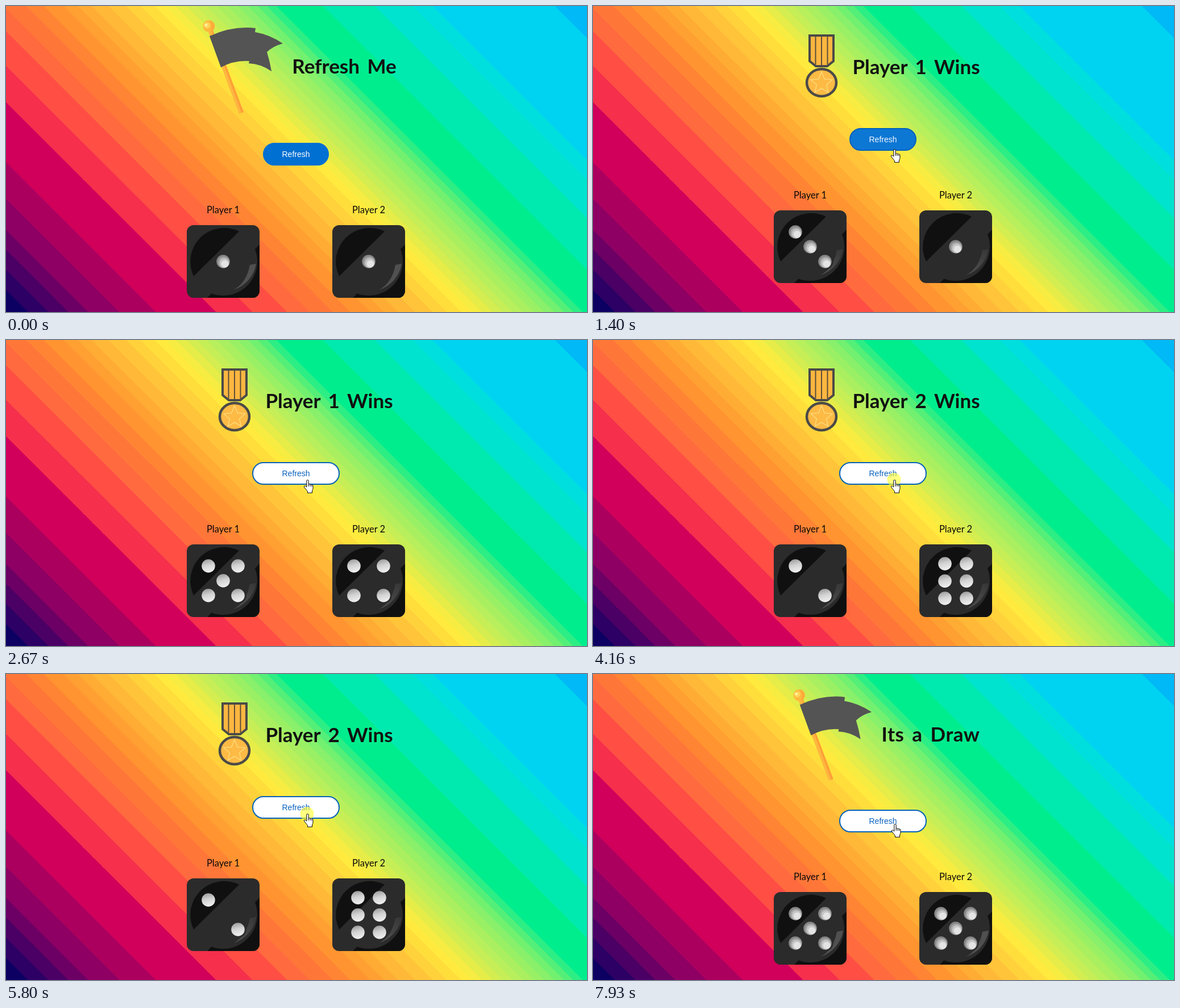
An HTML page for the animation above (8000 ms loop, 1022x539 px).

```html
<!DOCTYPE html>
<html lang="en">
<head>
<meta charset="utf-8">
<title>Dice game</title>
<style>
  html, body { margin: 0; width: 100%; height: 100%; overflow: hidden; }
  svg { display: block; width: 100vw; height: 100vh; }
  text { text-anchor: middle; font-family: Lato, sans-serif; }
  #title { font-size: 35px; font-weight: 700; word-spacing: 5px; fill: #111; }
  .label { font-size: 16.5px; fill: #0a0a0a; }
  #caption { font: 14px "Liberation Sans", Arial, sans-serif; }
</style>
</head>
<body>
<svg viewBox="0 0 1022 539">
  <defs>
    <linearGradient id="rainbow" gradientUnits="userSpaceOnUse" x1="0" y1="539" x2="780.5" y2="-241.5"></linearGradient>
    <linearGradient id="pipFill" x1=".35" y1="0" x2=".6" y2="1">
      <stop offset="0" stop-color="#9c9c9c"/><stop offset=".45" stop-color="#d2d2d2"/><stop offset="1" stop-color="#f2f2f2"/>
    </linearGradient>
    <linearGradient id="shine" gradientUnits="userSpaceOnUse" x1="118" y1="68" x2="88" y2="114">
      <stop offset="0" stop-color="#373737"/><stop offset="1" stop-color="#505050"/>
    </linearGradient>
    <clipPath id="dieClip"><rect width="128" height="128" rx="12"/></clipPath>
    <g id="dieBody" clip-path="url(#dieClip)">
      <rect width="128" height="128" fill="#2b2b2b"/>
      <path d="M128 34L36 128H128Z" fill="#101010"/>
      <circle cx="64" cy="64" r="60" fill="#2b2b2b"/>
      <path d="M12 90A59.5 59.5 0 0 1 92 11Z" fill="#101010"/>
    </g>
    <path id="glare" d="M111 70L122 68A58 58 0 0 1 82 114Q105 102 111 70Z"/>
    <g id="pipFlat">
      <circle r="11.8" fill="#858585"/>
      <circle cx="1" cy="1.4" r="10" fill="#a6a6a6"/>
      <circle cx="2" cy="2.8" r="8.4" fill="#c6c6c6"/>
      <circle cx="3" cy="4.2" r="6.2" fill="#e4e4e4"/>
    </g>
    <circle id="pipSoft" r="11.8" fill="url(#pipFill)"/>
  </defs>

  <rect width="1022" height="539" fill="url(#rainbow)"/>

  <g id="flag">
    <path d="M356 46L364 43L418 187L410 190Z" fill="#ffb740"/>
    <path d="M362 44L364 43L418 187L414 188.500Z" fill="#ff9f38"/>
    <circle cx="357" cy="35.500" r="10.500" fill="#ffb83d"/>
    <path d="M358 25.500A10.500 10.500 0 0 1 360 45.500Q364 34 358 25.500Z" fill="#ffaa3c"/>
    <circle cx="353.500" cy="34" r="5.500" fill="#ffd45a"/>
    <circle cx="352" cy="33.500" r="2.500" fill="#fff0a0"/>
    <path d="M358 53Q399 34 439 39L438 46Q463 50 487 66Q469 71 459 81Q464 97 467 115Q449 102 427 101L428 97Q402 95 378 108Z" fill="#545454"/>
  </g>

  <g id="medal">
    <path d="M381 52H423V97L412 106H392L381 97Z" fill="#fdb640" stroke="#4b4a48" stroke-width="4"/>
    <path d="M391.500 53V103M402 53V104M412.500 53V103" stroke="#5b5039" stroke-width="2"/>
    <ellipse cx="402" cy="135" rx="26" ry="24" fill="#fdba45" stroke="#4b4a48" stroke-width="4.500"/>
    <path id="star" fill="none" stroke="#ffd977" stroke-width="1.500"/>
  </g>

  <text id="title"></text>

  <g id="panel">
    <rect id="pill" height="38" y="242" rx="19" stroke-width="2"/>
    <text id="caption" x="510" y="266">Refresh</text>
    <text class="label" x="382" y="365">Player 1</text>
    <text class="label" x="638" y="365">Player 2</text>
    <g id="die1" transform="translate(318 386)"></g>
    <g id="die2" transform="translate(574 386)"></g>
  </g>

  <circle id="click" r="12" fill="#ffff32" fill-opacity=".62"/>
  <g id="arrow" fill="#fff" stroke="#000">
    <path d="M0 0V17L4 13.200L6.600 19L9 18L6.500 12.300H12Z"/>
  </g>
  <g id="hand" fill="#fff" stroke="#000" stroke-linejoin="round">
    <path d="M-1.700 13V2.200a1.700 1.700 0 0 1 3.400 0V8.500c.3-1 2.600-1 2.900.3c.6-.9 2.400-.6 2.700.6c.8-.7 2.200-.2 2.200 1.200V15c0 2-1.200 3.500-1.500 5v3.300H0v-2.600C-1 19-4.200 15.800-6 13c-.8-1.500.8-2.800 2.200-1.700Z"/>
    <path d="M1.700 8.500v3.500M4.600 9v3M7.300 9.600v2.600" fill="none"/>
  </g>
</svg>

<script>
const LOOP = 8000;
const $ = id => document.getElementById(id);
const set = (el, attrs) => { for (const k in attrs) el.setAttribute(k, attrs[k]); };
const show = (el, on) => { el.style.display = on ? '' : 'none'; };
// Value of the last [time, ...values] key reached.
const at = (keys, t) => keys.reduce((a, k) => k[0] <= t ? k : a).slice(1);
const mix = (a, b, p) => 'rgb(' + a.map((v, i) => Math.round(v + (b[i] - v) * p)) + ')';

// Diagonal colour bands: distance from the bottom-left corner, colour.
const BANDS = `0 0c0062,39 2c0064,75 4a0064,110 6c0064,145 8e0063,200 ac005f,264 d1005a,369 f52f4c,
434 ff4e44,494 ff6a3e,535 ff7639,575 ff8433,605 ff9430,640 ffa032,665 ffac34,690 ffb838,720 ffc43a,
750 ffd23b,775 ffde3c,800 ffea3d,820 f6ec42,838 e6ec48,856 d4ed50,874 c6ee56,892 b8ef5c,910 a9ef60,
928 9af064,946 88f06a,964 72f070,982 54ef78,998 2cee84,1014 00ed8e,1097 00eab0,1187 00e4cf,
1254 00dfde,1289 00d3f1,1504 00b9f6`.split(',').map(b => b.trim().split(' '));
const stop = (pos, color) => `<stop offset="${pos / 1561}" stop-color="#${color}"/>`;
$('rainbow').innerHTML = BANDS.map(([pos, color], i) =>
  stop(pos, color) + stop(i + 1 < BANDS.length ? BANDS[i + 1][0] : 1561, color)).join('');

const starPoints = Array.from({ length: 10 }, (_, i) => {
  const r = i % 2 ? 9 : 20, a = i * Math.PI / 5;
  return (402 + r * Math.sin(a)).toFixed(1) + ' ' + (136 - r * Math.cos(a)).toFixed(1);
});
$('star').setAttribute('d', 'M' + starPoints.join('L') + 'Z');

const corner = 26;
const two = [[-corner, -corner], [corner, corner]];
const four = [...two, [corner, -corner], [-corner, corner]];
const six = [-30, 0.5, 31].flatMap(y => [[-19, y], [19, y]]);
const PIPS = [[], [[0, 0]], two, [...two, [0, 0]], four, [...four, [0, 0]], six];

function dieMarkup(n, soft, shaded) {
  const pip = soft ? 'pipSoft' : 'pipFlat';
  const cut = n > 1 && n < 6 ? '<circle cx="90" cy="90" r="14.500" fill="#2b2b2b"/>' : '';
  return `<use href="#dieBody"/><use href="#glare" fill="${shaded ? 'url(#shine)' : '#505050'}"/>` + cut +
    PIPS[n].map(([x, y]) => `<use href="#${pip}" x="${64 + x}" y="${64 + y}"/>`).join('');
}

// Page layouts: title, title centre, baseline, panel shift, medal shown, letter spacing.
const START = ['Refresh Me', 595, 119, 0, false, 0];
const win = n => [`Player ${n} Wins`, 568.5, 120, -26, true, 0];
const DRAW = ['Its a Draw', 594, 119, -2, false, 0.5];

// Time, layout, dice, smooth pips.
const ROLLS = [
  [0, START, 1, 1, false], [1400, win(1), 3, 1, false], [2040, win(1), 4, 3, true],
  [2670, win(1), 5, 4, true], [3300, win(2), 2, 6, true], [4290, win(1), 4, 1, true],
  [4780, win(1), 5, 4, true], [5280, win(2), 2, 6, true], [5930, DRAW, 5, 5, false]
];
const HOVER = [[0, 0], [760, .26], [900, .53], [1020, .8], [1140, 1], [1400, .05], [1520, .3],
  [1660, .6], [1790, .85], [1910, .95], [2040, .97], [2300, 1]];
const APPROACH = [[130, 0], [260, .22], [380, .5], [510, .78], [630, .95]];
const HAND = [[0, 532.5, 268], [1020, 531.5, 262], [1140, 530.5, 256], [1270, 530.5, 252],
  [1660, 530.5, 249], [1790, 530.5, 246], [6920, 530.5, 262], [7050, 530.5, 277],
  [7430, 530.5, 273], [7930, 531.5, 264]];
const CLICKS = [[1270, 1400], [1910, 2040], [2540, 2670], [3170, 3300], [4160, 4290],
  [4670, 4780], [5170, 5280], [5800, 5930]];

const BLUE = [0, 112, 210], WHITE = [255, 255, 255], EDGE = [0, 96, 190];
let lastRoll = '';

function drawPage(t) {
  const [layout, a, b, soft] = at(ROLLS, t);
  const [title, x, y, shift, medal, spacing] = layout;
  const roll = [title, a, b].join();
  if (roll === lastRoll) return;
  lastRoll = roll;
  $('title').textContent = title;
  set($('title'), { x, y, 'letter-spacing': spacing });
  $('panel').setAttribute('transform', `translate(0 ${shift})`);
  show($('medal'), medal);
  show($('flag'), !medal);
  $('flag').setAttribute('transform', layout === DRAW ? 'translate(353 26) scale(.98 .976) translate(-347 -24)' : '');
  $('die1').innerHTML = dieMarkup(a, soft, medal);
  $('die2').innerHTML = dieMarkup(b, soft, medal);
}

function drawButton(t) {
  const [p] = at(HOVER, t);
  const half = 58 + 19 * p;
  set($('pill'), {
    x: 511 - half, width: 2 * half - 2,
    fill: mix(BLUE, WHITE, p), stroke: p ? mix(EDGE, [6, 98, 184], p) : mix(BLUE, BLUE, 0)
  });
  $('caption').setAttribute('fill', mix(WHITE, [10, 98, 192], p));
}

function drawPointer(t) {
  const onButton = t >= 630;
  show($('arrow'), t >= 130 && !onButton);
  show($('hand'), onButton);
  const clicking = CLICKS.some(([from, to]) => t >= from && t < to);
  show($('click'), clicking);
  let [x, y] = at(HAND, t);
  if (t >= 130 && t < 760) {
    const [p] = at(APPROACH, t);
    x = 966 + (x - 966) * p;
    y = 455 + (y - 455) * p;
  }
  $(onButton ? 'hand' : 'arrow').setAttribute('transform', `translate(${x} ${y})`);
  set($('click'), { cx: x - 1, cy: y });
}

function render(t) {
  drawPage(t);
  drawButton(t);
  drawPointer(t);
}

const begin = performance.now();
function tick() {
  render((performance.now() - begin) % LOOP);
  requestAnimationFrame(tick);
}
tick();
</script>
</body>
</html>
```
